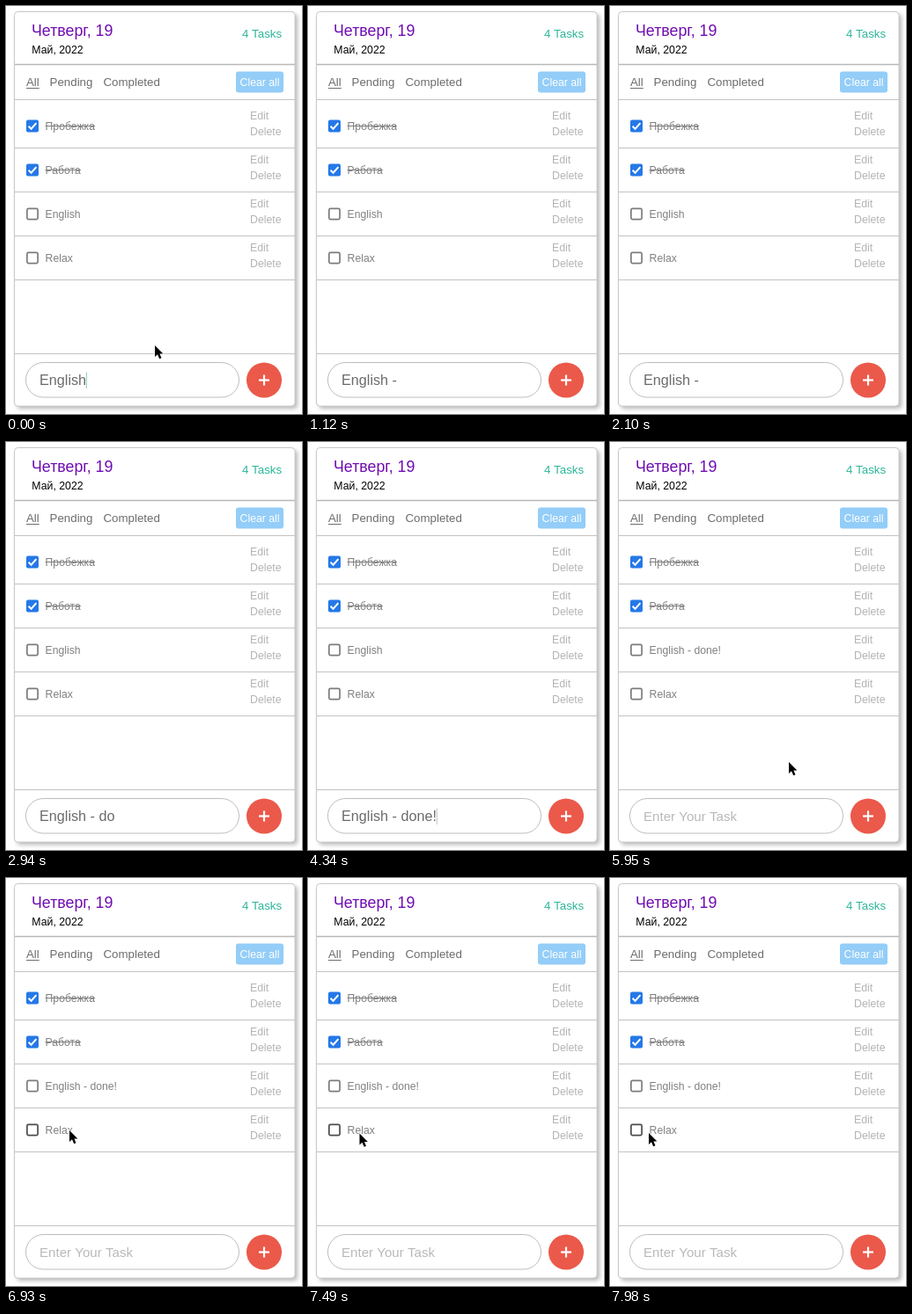
Animation, 336 px wide and 464 px high, one loop 8 s. Source, as an HTML page with a canvas:

```html
<!DOCTYPE html>
<html lang="ru">
<head>
<meta charset="utf-8">
<title>Tasks</title>
<style>
  html, body { margin: 0; width: 100%; height: 100%; overflow: hidden; background: #fff; }
  canvas { display: block; width: 336px; height: 464px; }
</style>
</head>
<body>
<canvas id="stage"></canvas>
<script>
const W = 336, H = 464, LOOP = 8000, STEP = 70;
const canvas = document.getElementById('stage');
const ctx = canvas.getContext('2d');
const dpr = window.devicePixelRatio || 1;
canvas.width = W * dpr;
canvas.height = H * dpr;

const SUBMIT = 5320;
// [time, text in the input]
const typing = [
  [0, 'English'], [560, 'English '], [840, 'English -'], [1470, 'English - '],
  [2450, 'English - d'], [2730, 'English - do'], [3080, 'English - don'],
  [3290, 'English - done'], [3430, 'English - done!'], [SUBMIT, '']
];
// [time, x, y] of the pointer tip
const path = [
  [4480, 232, 388], [4900, 293, 432], [5460, 292, 432], [5740, 258, 394],
  [6160, 148, 334], [6580, 70, 289], [6720, 72, 287],
  [7210, 72, 287], [7770, 45, 294], [7980, 44, 290]
];

function text(str, x, y, size, color) {
  ctx.font = `${size}px "Liberation Sans", Arial, sans-serif`;
  ctx.fillStyle = color;
  ctx.fillText(str, x, y);
  return ctx.measureText(str).width;
}

function box(x, y, w, h, r, fill, stroke, lw = 1) {
  ctx.beginPath();
  ctx.roundRect(x, y, w, h, r);
  if (fill) { ctx.fillStyle = fill; ctx.fill(); }
  if (stroke) { ctx.strokeStyle = stroke; ctx.lineWidth = lw; ctx.stroke(); }
}

function line(points, color, lw = 1) {
  ctx.beginPath();
  points.forEach(([x, y]) => ctx.lineTo(x, y));
  ctx.strokeStyle = color;
  ctx.lineWidth = lw;
  ctx.stroke();
}

function shadow(color, blur, dx, dy, draw) {
  ctx.save();
  ctx.shadowColor = color;
  ctx.shadowBlur = blur * dpr;
  ctx.shadowOffsetX = dx * dpr;
  ctx.shadowOffsetY = dy * dpr;
  draw();
  ctx.restore();
}

const rule = y => line([[10, y], [328, y]], '#c3c3c3');

function card() {
  shadow('rgba(0,0,0,.28)', 5, 3, 3, () => box(9.5, 6.5, 318.5, 448.5, 4, '#fff'));
  box(9.5, 6.5, 318.5, 448.5, 4, null, '#c8c8c8');
  line([[10, 66.5], [328, 66.5]], '#b9b9b9', 1.6);
  [106.5, 161.5, 211.5, 261.5, 311.5, 395.5].forEach(rule);
}

function header() {
  text('Четверг, 19', 29, 34, 17.8, '#6f0cb0');
  text('Май, 2022', 29.3, 54, 12.3, '#000');
  text('4 Tasks', 268, 36.3, 13.3, '#2bb598');
  const w = text('All', 23, 91, 13.3, '#6c6c6c');
  line([[23, 93.5], [23 + w, 93.5]], '#6c6c6c');
  text('Pending', 49.6, 91, 13.3, '#6c6c6c');
  text('Completed', 110.5, 91, 13.3, '#6c6c6c');
  box(261, 74.5, 54, 24, 3, '#93cdf8');
  text('Clear all', 265.6, 91, 12.25, '#fff');
}

function row(i, label, done, hover) {
  const y = 136.5 + 50 * i;
  if (done) {
    box(23, y - 7, 14, 14, 2, '#2478e8');
    line([[25.6, y + 0.3], [28.6, y + 3.2], [34.4, y - 3.4]], '#fff', 2);
  } else {
    box(23.9, y - 6.1, 12.2, 12.2, 1.6, '#fff', hover ? '#4c4c4c' : '#7c7c7c', 1.7);
  }
  const w = text(label, 44.6, y + 4, 12.2, '#808080');
  if (done) line([[44.6, y], [44.6 + w, y]], '#808080');
  text('Edit', 277, y - 7.2, 12.3, '#b4b4b4');
  text('Delete', 277, y + 10.8, 12.3, '#b4b4b4');
}

function footer(t, hover) {
  box(22.5, 405.5, 242, 39.5, 19.75, '#fff', '#bdbdbd');
  const value = typing.filter(k => k[0] <= t).pop()[1];
  if (value) {
    const w = text(value, 38, 431.2, 16.2, '#6b6b6b');
    if (t < 420) caret(38.3 + w, '#83d0bf');
    else if (t >= 4130 && t < 4620) caret(38.3 + w, '#c4c4c4');
  } else {
    text('Enter Your Task', 38, 431, 15.1, '#b9b9b9');
  }
  const button = () => {
    ctx.beginPath();
    ctx.arc(293, 425.5, 20, 0, 7);
    ctx.fillStyle = hover ? '#e85545' : '#eb594a';
    ctx.fill();
  };
  if (hover) shadow('rgba(0,0,0,.45)', 5, 1.5, 1.5, button);
  else button();
  line([[287, 425.5], [299, 425.5]], '#fff', 2.2);
  line([[293, 419.5], [293, 431.5]], '#fff', 2.2);
}

function caret(x, color) {
  line([[x, 416.5], [x, 435]], color);
}

function pointerAt(t) {
  if (t < 490) return [169, 386];
  if (t < path[0][0]) return null;
  const i = path.findIndex(p => p[0] >= t);
  if (i <= 0) return path[0].slice(1);
  const [t0, x0, y0] = path[i - 1], [t1, x1, y1] = path[i];
  const k = (t - t0) / (t1 - t0), e = k * k * (3 - 2 * k);
  return [x0 + (x1 - x0) * e, y0 + (y1 - y0) * e];
}

function shape(d, x, y, fill, stroke, lw) {
  ctx.save();
  ctx.translate(x, y);
  const p = new Path2D(d);
  ctx.lineJoin = 'round';
  ctx.strokeStyle = stroke;
  ctx.lineWidth = lw;
  ctx.stroke(p);
  ctx.fillStyle = fill;
  ctx.fill(p);
  ctx.restore();
}

const ARROW = 'M0 0V13L3 10.3L5.2 15.2L7.5 14.2L5.4 9.4H9.4Z';
const HAND = 'M-3 0Q-1.5 -1.6 -.2 0L1.7 5Q3 4 4.2 5.2Q5.6 4.4 6.6 5.8Q8.4 5.4 8.8 7.4' +
  'L9.2 10.6L8 15H1.2L-3.8 10Q-4.4 8.4 -2.8 8L-.8 9.2Z';

function pointer(pos, hand) {
  const [x, y] = pos;
  if (!hand) return shape(ARROW, x, y, '#000', '#fff', 1.6);
  shape(HAND, x, y, '#fff', '#000', 1.8);
  [2.6, 4.6, 6.6].forEach(d => line([[x + d, y + 9], [x + d + 0.2, y + 12.5]], '#000', 0.8));
}

function draw(t) {
  ctx.setTransform(dpr, 0, 0, dpr, 0, 0);
  ctx.fillStyle = '#fff';
  ctx.fillRect(0, 0, W, H);
  const pos = pointerAt(t);
  const onButton = !!pos && Math.hypot(pos[0] - 293, pos[1] - 425.5) < 20;
  const onRelax = !!pos && pos[0] < 78 && pos[1] > 277 && pos[1] < 296;
  card();
  header();
  row(0, 'Пробежка', true);
  row(1, 'Работа', true);
  row(2, t < SUBMIT ? 'English' : 'English - done!', false);
  row(3, 'Relax', false, onRelax);
  footer(t, onButton);
  if (pos) pointer(pos, onButton);
}

const start = performance.now();
function tick() {
  const t = (performance.now() - start) % LOOP;
  draw(Math.floor(t / STEP) * STEP);
  requestAnimationFrame(tick);
}
tick();
</script>
</body>
</html>
```
